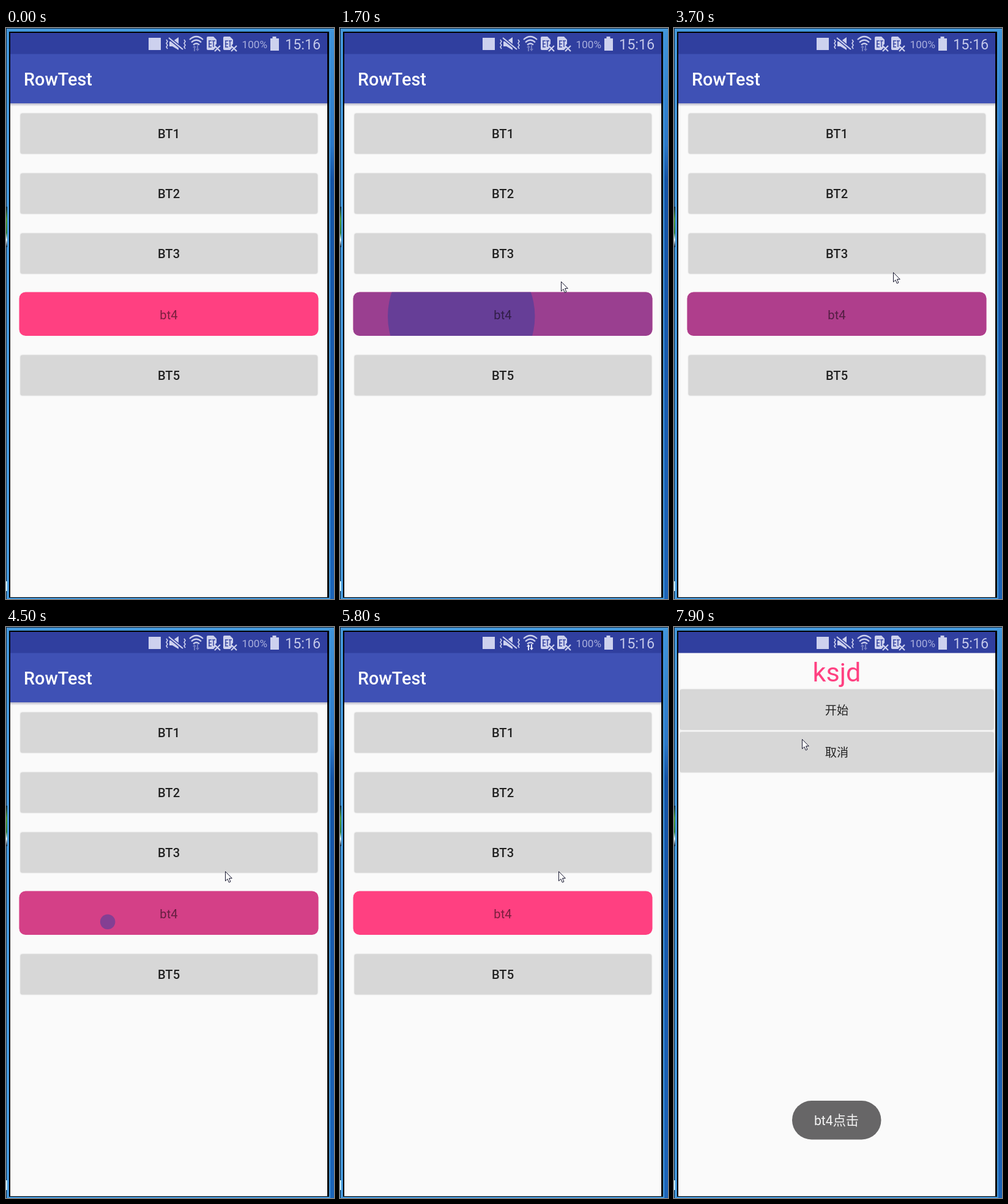
Animation of 536 by 933 pixels, one loop 8 s. Source, as an HTML page:

```html
<!DOCTYPE html>
<html lang="en">
<head>
<meta charset="utf-8">
<title>Button ripple demo</title>
<style>
  html, body { margin: 0; width: 100%; height: 100%; overflow: hidden; background: #000; }
  svg { display: block; width: 536px; height: 933px; }
  text { font-family: Roboto, "Noto Sans CJK SC", "Noto Sans CJK", sans-serif; }
  .mid { text-anchor: middle; }
  .label { fill: #222; font-weight: 500; }
  .latin { font-size: 20.2px; }
  .han { font-size: 19.2px; }
  .button { fill: #d7d7d7; filter: drop-shadow(0 .6px 1px rgba(0, 0, 0, .32)); }
  .icon { fill: #cdd1ee; }
  .line { fill: none; stroke: #cdd1ee; stroke-width: 2.2; }
</style>
</head>
<body>
<svg viewBox="0 0 536 933">
  <defs>
    <linearGradient id="rightEdge" x2="0" y2="1">
      <stop offset="0" stop-color="#3f93da"/>
      <stop offset=".2" stop-color="#2b78c8"/>
      <stop offset=".26" stop-color="#1453a5"/>
      <stop offset="1" stop-color="#1c64b8"/>
    </linearGradient>
    <linearGradient id="leftGlow" x2="0" y2="1">
      <stop offset="0" stop-color="#123"/>
      <stop offset=".3" stop-color="#4c9a32"/>
      <stop offset=".65" stop-color="#2f7d3a"/>
      <stop offset=".82" stop-color="#e9fbff"/>
      <stop offset="1" stop-color="#123"/>
    </linearGradient>
    <linearGradient id="barShadow" x2="0" y2="1">
      <stop offset="0" stop-color="#28285a" stop-opacity=".32"/>
      <stop offset="1" stop-color="#28285a" stop-opacity="0"/>
    </linearGradient>
    <clipPath id="pill"><rect x="21.5" y="431.5" width="489" height="71.5" rx="10.5"/></clipPath>
    <clipPath id="content"><rect x="7" y="42" width="518" height="888"/></clipPath>
    <g id="sim">
      <path class="icon" d="M0 2Q0 0 2 0H11L16 5V12L13 15L15 18L11 22H2Q0 22 0 20Z"/>
      <path d="M3 7H8M3 12H8M3 17H8M4 7V17M9 7H14M11 7V17" fill="none" stroke="#3745a2" stroke-width="1.5"/>
      <path class="line" d="M13 15L22 24M22 15L13 24"/>
    </g>
  </defs>

  <!-- Window frame -->
  <rect width="536" height="933" fill="#4398dc"/>
  <rect x="530" y="6" width="6" height="927" fill="url(#rightEdge)"/>
  <path d="M0 .5H536M.5 0V933" stroke="#123" fill="none"/>
  <rect y="292" width="2" height="66" fill="url(#leftGlow)"/>
  <rect y="904" width="2" height="16" fill="#c9f0ff"/>
  <rect x="5" y="6" width="523" height="925" fill="#000"/>
  <rect x="7" y="8" width="518" height="922" fill="#fafafa"/>

  <g clip-path="url(#content)">
    <g id="listScreen">
      <rect x="7" y="123" width="518" height="5" fill="url(#barShadow)"/>
      <rect x="7" y="42" width="518" height="81" fill="#3f51b5"/>
      <text x="29" y="94" font-size="28.8" font-weight="500" fill="#fff">RowTest</text>
      <g clip-path="url(#pill)">
        <rect x="21" y="431" width="490" height="73" fill="#ff4081"/>
        <rect id="tint" x="21" y="431" width="490" height="73" fill="#303f9f"/>
        <circle id="wave" fill="#303f9f"/>
      </g>
      <text class="mid" x="266" y="475.5" font-size="20.2" opacity=".52">bt4</text>
    </g>
    <g id="detailScreen">
      <rect x="7" y="42" width="518" height="970" fill="#fafafa"/>
      <text class="mid" x="266" y="89" font-size="43.2" fill="#ff4081">ksjd</text>
    </g>
  </g>

  <!-- Status bar -->
  <rect x="7" y="8" width="518" height="34.5" fill="#303f9f"/>
  <rect x="233" y="16" width="20" height="20" class="icon"/>
  <path class="line" style="stroke-width:1.6" d="M262 19l2 3l-2 3l2 3l-2 3l2 3M291 19l2 3l-2 3l2 3l-2 3l2 3"/>
  <path class="icon" d="M267 22H272L282 15V36L272 30H267Z"/>
  <path d="M266 16L289 35" stroke="#303f9f" stroke-width="5"/>
  <path class="line" d="M266 16L289 35"/>
  <path class="line" d="M300 19Q311 9 322 19M303 23.5Q311 16 319 23.5M306 27.5Q311 23 316 27.5"/>
  <path id="traffic" d="M305 32L308 28L311 32H309V38H307V32ZM310 34H312V28H314V34H316L313 38Z"/>
  <use href="#sim" x="328" y="14"/>
  <use href="#sim" x="355" y="14"/>
  <text x="385.5" y="33" font-size="17.2" fill="#a9afde">100%</text>
  <path class="icon" d="M435.5 14H441.5V17H446V37H432V17H435.5Z"/>
  <text x="456" y="35" font-size="23.4" fill="#c3c8ea">15:16</text>

  <g id="toast">
    <rect x="193" y="774" width="145.5" height="63.5" rx="31.75" fill="#676667"/>
    <text class="mid" x="265.5" y="814" font-size="21.2" fill="#f4f4f4">bt4点击</text>
  </g>

  <path id="cursor" d="M.5 .5V16L4 12.7L6.3 18.3L8.9 17.2L6.6 11.6H11.3Z" fill="#fff" stroke="#181830"/>
</svg>
<script>
const LOOP = 8000, STEP = 100;
const RIPPLE_ALPHA = 0.485, RIPPLE_RADIUS = 250, FADE = 450;
const $ = id => document.getElementById(id);
const clamp = v => Math.min(1, Math.max(0, v));
const mix = (a, b, p) => a + (b - a) * p;
const easeInOut = p => (1 - Math.cos(Math.PI * p)) / 2;

function addButton(screen, x, y, width, height, label, baseline, script) {
  screen.insertAdjacentHTML('beforeend',
    `<rect class="button" x="${x}" y="${y}" width="${width}" height="${height}" rx="2.5"/>
     <text class="mid label ${script}" x="266" y="${baseline}">${label}</text>`);
}
[[1, 140], [2, 238], [3, 336], [5, 535]].forEach(([n, y]) =>
  addButton($('listScreen'), 24, y, 484.5, 65, 'BT' + n, y + 40, 'latin'));
addButton($('detailScreen'), 10, 102.5, 512, 65, '开始', 143.2, 'han');
addButton($('detailScreen'), 10, 172, 512, 65, '取消', 212.2, 'han');

const presses = [
  { start: 1020, release: 3450, x: 135.5, y: 474, grow: 1230 },
  { start: 4245, release: 5130, x: 161, y: 482.5, grow: 1230 },
  { start: 6350, release: 6480, x: 162, y: 480, grow: 600 },
];

// Pointer stops: time, x, y
const pointerPath = [
  [100, 510, 254], [700, 355, 400], [900, 355, 400], [1200, 361, 414],
  [1800, 361, 414], [2300, 358, 404], [3100, 358, 404], [3200, 358, 399],
  [5700, 358, 399], [5800, 357, 399], [5900, 357, 399], [6200, 354, 397],
  [6400, 354, 397], [6700, 264, 229], [7200, 254, 135], [7700, 205, 220],
  [7800, 205, 220], [7900, 209, 183],
];

function pointerAt(t) {
  const i = pointerPath.findIndex(stop => stop[0] >= t);
  if (i <= 0) return pointerPath[0].slice(1);
  const [t0, x0, y0] = pointerPath[i - 1], [t1, x1, y1] = pointerPath[i];
  const p = (t - t0) / (t1 - t0);
  return [mix(x0, x1, p), mix(y0, y1, p)].map(Math.round);
}

function drawRipple(t) {
  const press = presses.findLast(p => t >= p.start);
  const wave = $('wave');
  if (!press) {
    $('tint').setAttribute('opacity', 0);
    wave.setAttribute('r', 0);
    return;
  }
  const fade = RIPPLE_ALPHA * (1 - clamp((t - press.release) / FADE));
  const spread = easeInOut(clamp((t - press.start - 80) / press.grow));
  $('tint').setAttribute('opacity', fade * clamp((t - press.start) / 600));
  wave.setAttribute('opacity', fade);
  wave.setAttribute('r', RIPPLE_RADIUS * spread);
  wave.setAttribute('cx', mix(press.x, 266, spread));
  wave.setAttribute('cy', mix(press.y, 467.5, spread));
}

function render(t) {
  drawRipple(t);

  const rest = 1 - clamp((t - 6500) / 230);
  $('detailScreen').setAttribute('opacity', 1 - rest ** 1.4);
  $('detailScreen').setAttribute('transform', `translate(0 ${Math.floor(74 * rest ** 2)})`);
  $('toast').setAttribute('opacity', clamp((t - 6550) / 250));
  $('traffic').setAttribute('fill', t >= 4900 && t < 6400 ? '#e4e7f8' : '#717bc0');

  $('cursor').setAttribute('visibility', t < 100 ? 'hidden' : 'visible');
  $('cursor').setAttribute('transform', `translate(${pointerAt(t)})`);
}

const begin = performance.now();
function tick() {
  const t = (performance.now() - begin) % LOOP;
  render(Math.floor(t / STEP) * STEP);
  requestAnimationFrame(tick);
}
tick();
</script>
</body>
</html>
```
